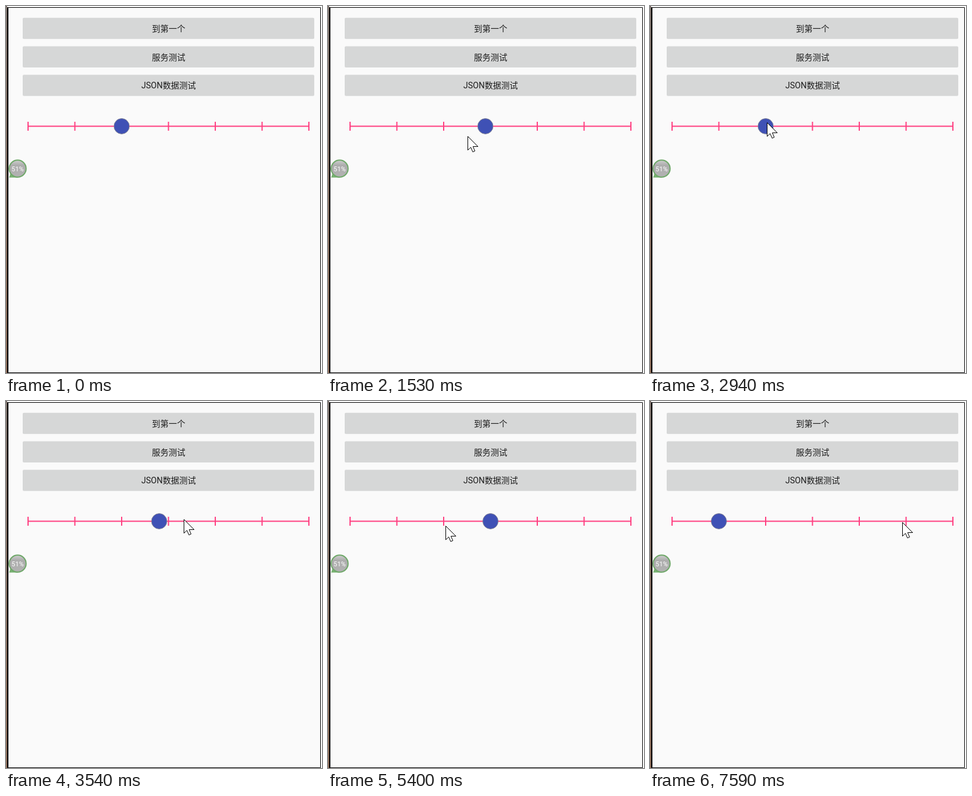
An HTML page for the animation above (8 s loop, 530x615 px).

```html
<!DOCTYPE html>
<html lang="zh-CN">
<head>
<meta charset="utf-8">
<title>Slider</title>
<style>
html, body { margin: 0; width: 100%; height: 100%; overflow: hidden; background: #fff; }
svg { display: block; width: 530px; height: 615px; }
text { font-family: Roboto, "Noto Sans CJK SC", "Noto Sans CJK", sans-serif; text-anchor: middle; }
.label { font-size: 14px; fill: #1c1c1c; }
</style>
</head>
<body>
<svg viewBox="0 0 530 615">
  <defs>
    <linearGradient id="ball" x1="0" y1="0" x2="0" y2="1">
      <stop offset="0" stop-color="#cfcfcf"/>
      <stop offset=".3" stop-color="#adadad"/>
      <stop offset="1" stop-color="#b2b2b2"/>
    </linearGradient>
    <linearGradient id="edge" x1="0" y1="0" x2="0" y2="1">
      <stop offset="0" stop-color="#7d726c"/>
      <stop offset="1" stop-color="#8c6c58"/>
    </linearGradient>
  </defs>
  <rect width="2" height="615" fill="url(#edge)"/>
  <rect x="3" y="2.5" width="524.5" height="612" fill="#fafafa"/>
  <path d="M3 2v613" stroke="#000" stroke-width="2"/>
  <path d="M3 2.5H527.5V614.5H3" fill="none" stroke="#000"/>
  <g id="buttons"></g>
  <path id="track" fill="none" stroke="#ff4081" stroke-width="2"/>
  <path d="M5 287.5L8 280 20 287.5Z" fill="#79b273"/>
  <circle cx="19.5" cy="272.5" r="14.2" fill="url(#ball)" stroke="#6fa869" stroke-width="2"/>
  <text x="19.5" y="277" font-size="11" fill="#fff">51%</text>
  <circle id="thumb" cy="201.5" r="12.9" fill="#3f51b5" stroke="#83838f" stroke-width=".9"/>
  <path id="cursor" d="M.5 .5V23.5L5.5 18.8 8.8 26.5 12.4 25 9.2 17.5H17.5Z" fill="#fff" stroke="#000"/>
</svg>
<script>
const LOOP = 8000, STEP = 30, ENTER = 270;
const LAG = 160; // the dragged thumb trails the pointer
const $ = id => document.getElementById(id);
const tick = i => 37 + i * 78.5;

$("buttons").innerHTML = ["到第一个", "服务测试", "JSON数据测试"].map((label, i) => {
  const y = 19.8 + i * 47.7;
  return `<rect x="28" y="${y}" width="489" height="35.5" rx="2" fill="#d6d7d7"/>
    <text class="label" x="272.8" y="${Math.round(y + 23)}">${label}</text>`;
}).join("");

let line = "M36 201.5H509";
for (let i = 0; i < 7; i++) line += `M${tick(i)} 194v15`;
$("track").setAttribute("d", line);

const smooth = p => p * p * (3 - 2 * p);
const slowing = p => 1 - (1 - p) ** 1.6;

// pointer moves: start, end, goal x, goal y, easing
const moves = [
  [240, 810, 355, 216, slowing],
  [960, 2280, 152, 219, slowing],
  [2400, 2940, 196, 195, smooth],
  [3060, 3690, 315, 198, smooth],
  [4020, 4290, 369, 200, smooth],
  [4380, 4740, 275, 204, smooth],
  [5070, 5400, 197, 209, smooth],
  [5430, 5640, 195, 205, smooth],
  [6000, 6420, 113, 204, smooth],
  [6840, 7590, 423, 203, smooth]
];

// thumb: from this time at this tick, or dragged
const DRAG = -1;
const stops = [
  [0, 2], [30, 5], [750, 4], [1130, DRAG], [1980, 2], [3240, DRAG],
  [4050, 4], [5100, 3], [6030, 2], [6870, 1]
];

function pointer(t) {
  let x = 530, y = 60;
  for (const [from, to, goalX, goalY, ease] of moves) {
    if (t <= from) break;
    const k = ease(Math.min(1, (t - from) / (to - from)));
    x += (goalX - x) * k;
    y += (goalY - y) * k;
  }
  return [x, y];
}

function thumbX(t) {
  const stop = stops.filter(s => s[0] <= t).pop()[1];
  return stop === DRAG ? pointer(t - LAG)[0] : tick(stop);
}

const start = performance.now();
function draw(now) {
  const time = Math.max(0, now - start) % LOOP;
  const t = Math.floor(time / STEP) * STEP;
  const [x, y] = pointer(t).map(Math.round);
  $("thumb").setAttribute("cx", thumbX(t));
  $("cursor").setAttribute("transform", `translate(${x} ${y})`);
  $("cursor").setAttribute("visibility", t < ENTER ? "hidden" : "visible");
  requestAnimationFrame(draw);
}
draw(start);
</script>
</body>
</html>
```
